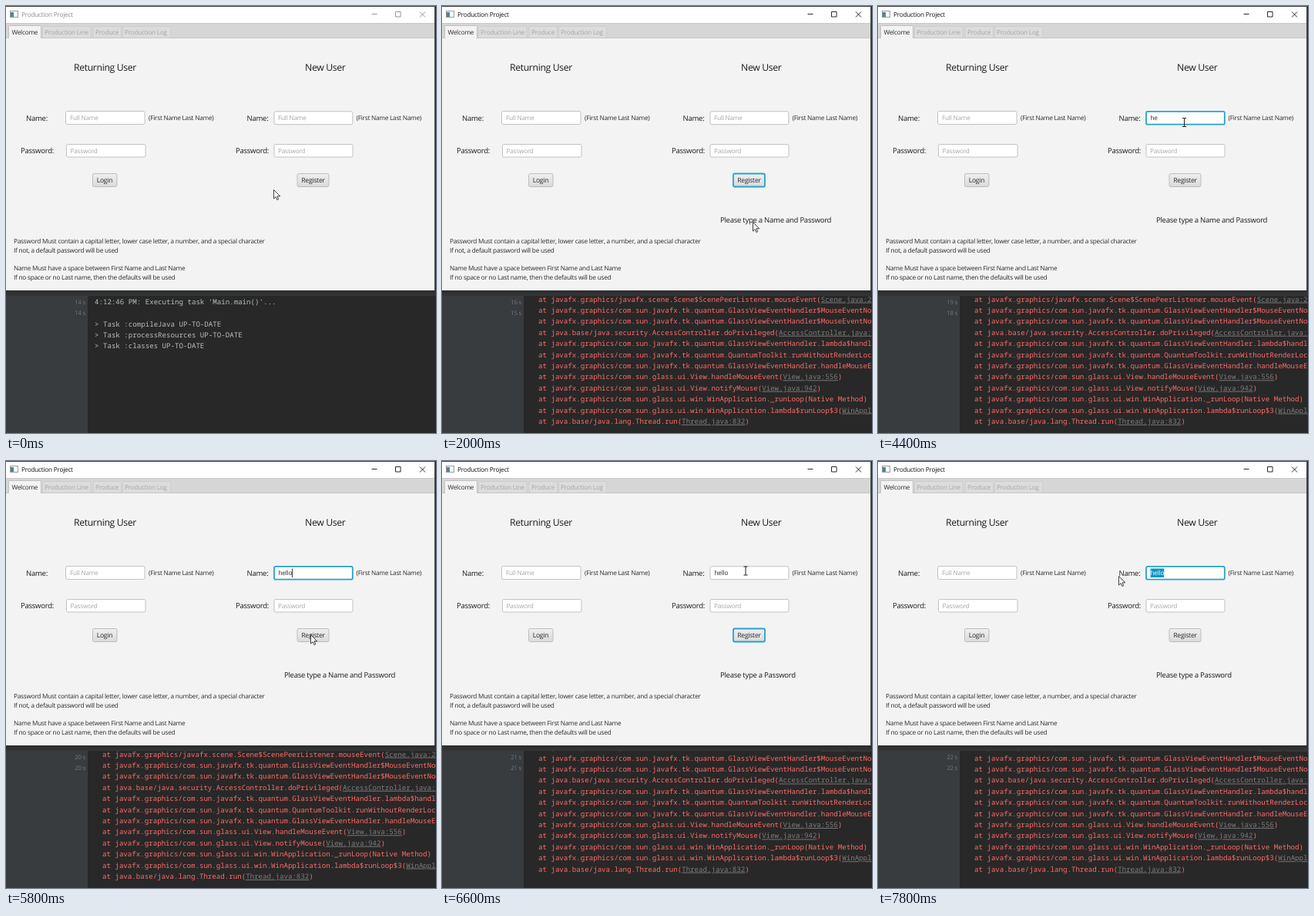
An HTML page for the animation above (8 s loop, 558 by 554 pixels).

```html
<!DOCTYPE html>
<html lang="en">
<head>
<meta charset="utf-8">
<title>Production Project</title>
<style>
  html, body { margin: 0; width: 100%; height: 100%; overflow: hidden; background: #282828; }
  svg {
    display: block; width: 558px; height: 554px; fill: #2b2b2b;
    font: 8.25px "Open Sans", sans-serif; letter-spacing: -.029em; text-rendering: geometricPrecision;
  }
  text { letter-spacing: -.029em; }
  .head { font-size: 12.26px; fill: #1c1c1c; }
  .label { font-size: 9.57px; fill: #1c1c1c; }
  .button { font-size: 8.6px; text-anchor: middle; }
  .prompt, .off { fill: #a6a6a6; }
  .mono text { font: 500 9.13px "Noto Sans Mono", "DejaVu Sans Mono", monospace; letter-spacing: 0; white-space: pre; }
  .mono { fill: #b9bdc1; }
  .trace { fill: #ff6a66; }
  .link { fill: #7c7c7c; text-decoration: underline; }
  .time { font-size: 7.8px; fill: #74777a; text-anchor: end; }
  .field { fill: #fff; stroke: #c2c2c2; }
  .push { fill: url(#push); stroke: #bdbdbd; }
  .focus { stroke: #25a3cd; stroke-width: 1.8; }
</style>
</head>
<body>
<svg viewBox="0 0 558 554">
  <defs>
    <linearGradient id="push" x2="0" y2="1"><stop stop-color="#efefef"/><stop offset="1" stop-color="#dadada"/></linearGradient>
    <linearGradient id="shade" x2="0" y2="1"><stop stop-color="#292b2c"/><stop offset="1" stop-color="#343638"/></linearGradient>
  </defs>

  <!-- console -->
  <rect width="558" height="554" fill="#282828"/>
  <rect y="369" width="106" height="185" fill="#393c3e"/>
  <g id="build" class="mono">
    <text x="115" y="387">4:12:46 PM: Executing task 'Main.main()'...</text>
    <text x="115" y="415.6">&gt; Task :compileJava UP-TO-DATE</text>
    <text x="115" y="430">&gt; Task :processResources UP-TO-DATE</text>
    <text x="115" y="444.4">&gt; Task :classes UP-TO-DATE</text>
  </g>
  <g id="trace" class="mono trace"></g>
  <text id="time1" class="time" x="103" y="387"/>
  <text id="time2" class="time" x="103" y="400.8"/>
  <rect y="369" width="558" height="7" fill="url(#shade)"/>

  <!-- window -->
  <rect width="558" height="369" fill="#3c3c3c"/>
  <rect y="1" width="556" height="368" fill="#f3f3f3"/>
  <rect y="1" width="556" height="21" fill="#fff"/>
  <rect x="5.5" y="6.5" width="10" height="8" fill="#fff" stroke="#9a9a9a"/>
  <rect x="6" y="8" width="4" height="6" fill="#4d8596"/>
  <g id="title">
    <text x="20" y="13.8">Production Project</text>
    <path d="M474.500 10.500h7M505.500 7.500h6.500v6.500h-6.500zM537 7.500l7 7m0-7l-7 7" fill="none" stroke="currentColor" stroke-width=".9"/>
  </g>

  <!-- tabs -->
  <rect y="22" width="556" height="19.500" fill="#d6d6d6"/>
  <path d="M0 22.500H556M0 41.500H556" stroke="#c8c8c8"/>
  <path d="M47.500 41V26.500h62.500V41M113 41V26.500h36.500V41M151.500 41V26.500h62V41" fill="#dcdcdc" stroke="#cdcdcd"/>
  <path d="M3.500 42V25.500h42V42" fill="#f3f3f3" stroke="#c2c2c2"/>
  <text x="7.500" y="36.600">Welcome</text>
  <g class="off">
    <text x="50" y="36.600">Production Line</text>
    <text x="116" y="36.600">Produce</text>
    <text x="154" y="36.600">Production Log</text>
  </g>

  <!-- returning user -->
  <text class="head" x="88" y="84.300">Returning User</text>
  <text class="label" x="26" y="148.600">Name:</text>
  <rect class="field" x="77.500" y="136.500" width="102.500" height="17" rx="2"/>
  <text class="prompt" x="83" y="148.300">Full Name</text>
  <text x="185" y="148.300">(First Name Last Name)</text>
  <text class="label" x="19" y="191.300">Password:</text>
  <rect class="field" x="78.500" y="179.500" width="102.500" height="16.500" rx="2"/>
  <text class="prompt" x="83.500" y="190.800">Password</text>
  <rect class="push" x="112.500" y="217.500" width="31.500" height="17" rx="2"/>
  <text class="button" x="128" y="229">Login</text>

  <!-- new user -->
  <text class="head" x="388" y="84.300">New User</text>
  <text class="label" x="312.500" y="148.600">Name:</text>
  <rect id="name" class="field" x="348" y="136.800" width="101.800" height="16.900" rx="2"/>
  <text id="prompt" class="prompt" x="353" y="148.300">Full Name</text>
  <rect id="mark" y="139.500" height="11.500" fill="#0f93c3"/>
  <text id="typed" x="353.500" y="148.300"><tspan></tspan><tspan fill="#fff"></tspan></text>
  <path id="caret" d="M0 139.500v11.500" stroke="#222" stroke-width=".9"/>
  <text x="454.500" y="148.300">(First Name Last Name)</text>
  <text class="label" x="298" y="191.300">Password:</text>
  <rect class="field" x="348" y="179.500" width="102" height="16.500" rx="2"/>
  <text class="prompt" x="353" y="190.800">Password</text>
  <rect id="register" class="push" x="378" y="217.500" width="41" height="17" rx="2"/>
  <text class="button" x="398.500" y="229">Register</text>
  <text id="message" class="label" x="361" y="281.300"/>

  <text x="10" y="307.800">Password Must contain a capital letter, lower case letter, a number, and a special character</text>
  <text x="10" y="319.600">If not, a default password will be used</text>
  <text x="10" y="342.900">Name Must have a space between First Name and Last Name</text>
  <text x="10" y="354.700">If no space or no Last name, then the defaults will be used</text>

  <path id="arrow" d="M0 0V11.500L2.700 9 4.400 13 6.200 12.200 4.500 8.300H8.200Z" fill="#fff" stroke="#111" stroke-width=".8"/>
  <path id="beam" d="M-2.500-5.500H2.500M0-5.500V5.500M-2.500 5.500H2.500" stroke="#222"/>
</svg>
<script>
const LOOP = 8000;
const $ = id => document.getElementById(id);
const show = (id, on) => $(id).style.display = on ? "" : "none";
const moveTo = (id, x, y) => $(id).setAttribute("transform", `translate(${x} ${y})`);

// Stack trace: the part after "|" is a link.
const FX = "javafx.graphics/", TK = FX + "com.sun.javafx.tk.quantum.";
const GLASS = FX + "com.sun.glass.ui.", HANDLER = TK + "GlassViewEventHandler";
const calls = [
  FX + "javafx.scene.Scene$ScenePeerListener.mouseEvent|Scene.java:2",
  HANDLER + "$MouseEventNo",
  HANDLER + "$MouseEventNo",
  "java.base/java.security.AccessController.doPrivileged|AccessController.java:",
  HANDLER + ".lambda$handl",
  TK + "QuantumToolkit.runWithoutRenderLoc",
  HANDLER + ".handleMouseE",
  GLASS + "View.handleMouseEvent|View.java:556",
  GLASS + "View.notifyMouse|View.java:942",
  GLASS + "win.WinApplication._runLoop(Native Method)",
  GLASS + "win.WinApplication.lambda$runLoop$3|WinAppl",
  "java.base/java.lang.Thread.run|Thread.java:832"
];
$("trace").innerHTML = calls.map((call, i) => {
  const [code, link] = call.split("|");
  const tail = link ? `(<tspan class="link">${link}</tspan>${/\d\d$/.test(link) ? ")" : ""}` : "";
  return `<text x="125" y="${383.6 + i * 14.4}">at ${code}${tail}</text>`;
}).join("");

// Pointer path: time, x, y
const path = [
  [0, 347.5, 238.5], [200, 347.5, 238.5], [900, 394, 227], [1400, 394, 227],
  [2000, 403.5, 280.5], [2500, 403.5, 280.5], [3000, 397.5, 151], [5200, 397.5, 151],
  [5700, 395.5, 225.5], [6150, 395.5, 225.5], [6550, 394, 142.5], [6900, 394, 142.5],
  [7800, 312.5, 149.5], [LOOP, 312.5, 149.5]
];

function pointer(t) {
  const i = path.findIndex(p => p[0] > t);
  const [t0, x0, y0] = path[i - 1], [t1, x1, y1] = path[i];
  const k = (t - t0) / (t1 - t0), e = k * k * (3 - 2 * k);
  return [x0 + (x1 - x0) * e, y0 + (y1 - y0) * e];
}

function focused(t) {
  if (t < 1000) return "";
  return t < 3000 || (t >= 6000 && t < 6900) ? "register" : "name";
}

function draw(t) {
  const s = t / 1000, focus = focused(t), [x, y] = pointer(t);
  const tone = t < 1000 ? "#8c8c8c" : "#111";
  $("title").style.fill = $("title").style.color = tone;
  for (const id of ["name", "register"]) $(id).classList.toggle("focus", focus === id);

  $("time1").textContent = Math.floor(14.6 + s) + " s";
  $("time2").textContent = Math.floor(14 + .93 * s + .02 * s * s) + " s";
  show("build", t < 1400);
  show("trace", t >= 1400);
  moveTo("trace", 0, t < 6200 ? 0 : -9.3);
  $("message").textContent = t < 1400 ? "" :
    t < 6200 ? "Please type a Name and Password" : "Please type a Password";

  // One letter every 200 ms, then a drag that selects from the end.
  const word = "hello".slice(0, Math.max(0, Math.floor((t - 4000) / 200)));
  const start = t < 6900 ? word.length : Math.round(Math.min(1, Math.max(0, (x - 353.5) / 18)) * 5);
  const typed = $("typed"), [plain, picked] = typed.children;
  plain.textContent = word.slice(0, start);
  picked.textContent = word.slice(start);
  const left = plain.getComputedTextLength(), full = typed.getComputedTextLength();
  $("mark").setAttribute("x", 353.5 + left);
  $("mark").setAttribute("width", Math.max(0, full - left));
  show("prompt", t < 3000);
  show("caret", focus === "name" && t < 6000 && t % 1000 >= 500);
  moveTo("caret", 353.8 + full, 0);

  const overField = x > 348 && x < 450 && y > 137 && y < 154;
  show("beam", overField);
  show("arrow", !overField);
  moveTo("beam", x, y);
  moveTo("arrow", x, y);
}

function tick() {
  draw(performance.now() % LOOP);
  requestAnimationFrame(tick);
}
tick();
</script>
</body>
</html>
```
